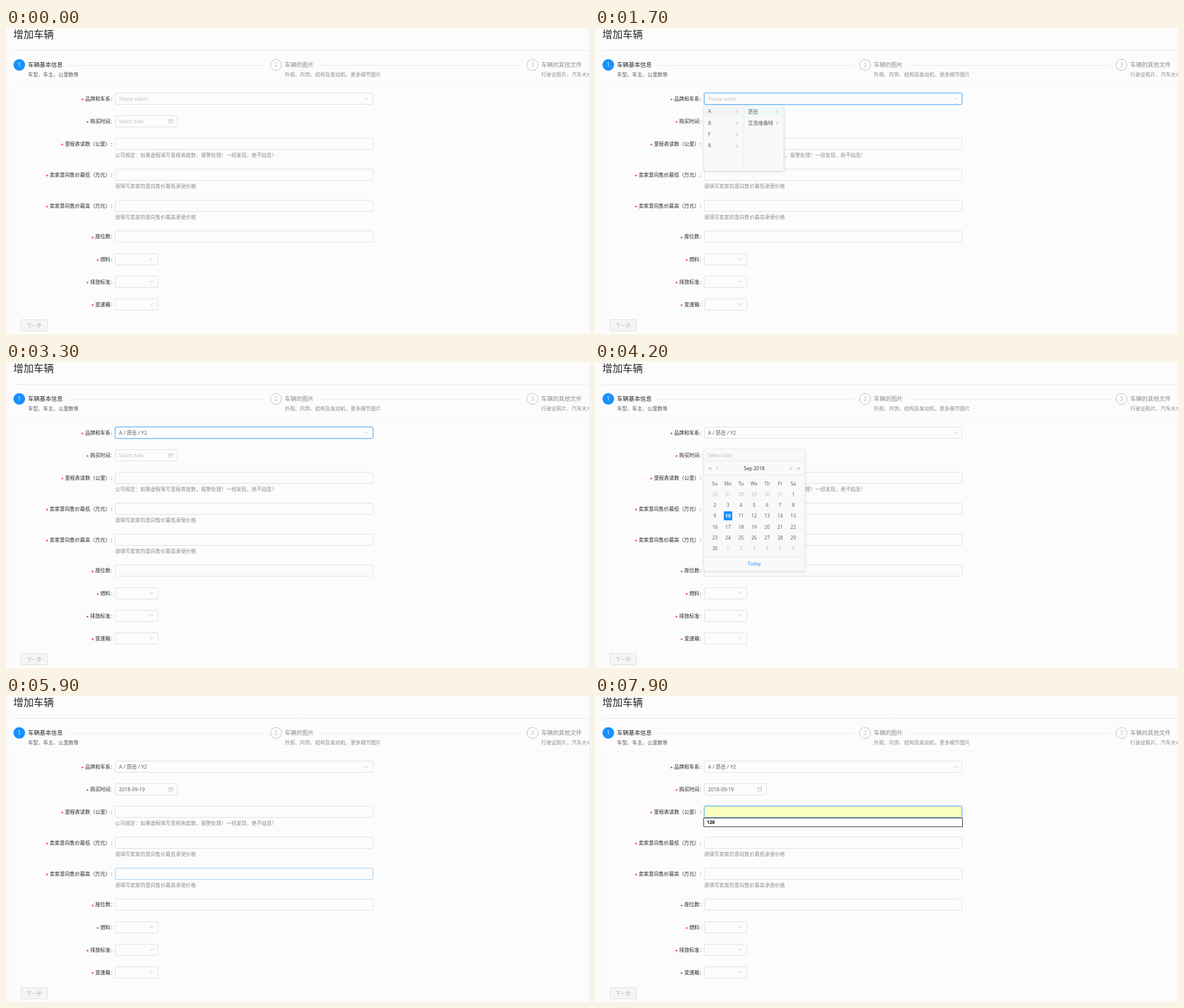
Write an HTML page with a canvas that moves like this. It is 1032 by 543 pixels and loops after 8 s.

```html
<!DOCTYPE html>
<html lang="zh">
<head>
<meta charset="utf-8">
<style>
html, body { margin: 0; width: 100%; height: 100%; overflow: hidden; background: #fcfcfc; }
canvas { display: block; }
</style>
</head>
<body>
<canvas id="stage" width="1032" height="543"></canvas>
<script>
const ctx = document.getElementById('stage').getContext('2d');
const LOOP = 8000, STEP = 100;
const FONT = '"Open Sans", "Noto Sans CJK SC", "Noto Sans CJK", sans-serif';
const PAPER = '#fcfcfc', PANEL = '#f9f9f9', EDGE = '#dedede', BLUE = '#1890ff';
const CJK = 8.96, LATIN = 8.5;
const ink = a => `rgba(0,0,0,${a})`;
const MAKE = '昂岳', MODEL = 'Y2';
const ROW = { brand: 125.5, date: 165.5, km: 205.5, min: 260.5, max: 315.5, seats: 370, fuel: 410.5, emission: 450.5, gear: 490.5 };
const LABELS = {
  brand: '品牌和车系', date: '购买时间', km: '里程表读数（公里）', min: '卖家意向售价最低（万元）',
  max: '卖家意向售价最高（万元）', seats: '座位数', fuel: '燃料', emission: '排放标准', gear: '变速箱'
};
let now = 0;

// Progress through a stepped transition; the last step is complete.
const ramp = (first, last) => Math.min(1, Math.max(0, (now - first + STEP) / (last - first + STEP)));
const during = (from, to) => now >= from && now < to;

function text(str, x, y, { size = CJK, color = ink(.65), weight = 400, align = 'left' } = {}) {
  ctx.font = `${weight} ${size}px ${FONT}`;
  ctx.fillStyle = color;
  ctx.textAlign = align;
  ctx.fillText(str, x, y + size * .36);
}

function line(points, color = '#e8e8e8', width = 1) {
  ctx.beginPath();
  points.forEach(([x, y]) => ctx.lineTo(x, y));
  ctx.strokeStyle = color;
  ctx.lineWidth = width;
  ctx.stroke();
}

function box(x, y, w, h, r, fill, stroke, width = 1) {
  ctx.beginPath();
  ctx.roundRect(x, y, w, h, r);
  if (fill) { ctx.fillStyle = fill; ctx.fill(); }
  if (stroke) { ctx.strokeStyle = stroke; ctx.lineWidth = width; ctx.stroke(); }
}

function chevron(x, y, dir, size = 2.7, color = ink(.28)) {
  const s = size, d = size * .55;
  const shapes = {
    down: [[-s, -d], [0, d], [s, -d]],
    up: [[-s, d], [0, -d], [s, d]],
    right: [[-d, -s], [d, 0], [-d, s]],
    left: [[d, -s], [-d, 0], [d, s]]
  };
  line(shapes[dir].map(([a, b]) => [x + a, y + b]), color, .8);
}

function field(y, w, { hover = 0, focus = 0, fill = PAPER } = {}) {
  const active = Math.max(hover, focus);
  if (focus) box(192.5, y - 11, w + 2, 22, 3, null, `rgba(24,144,255,${.3 * focus})`);
  box(193.5, y - 10, w, 20, 2.5, fill, EDGE);
  if (active) box(193.5, y - 10, w, 20, 2.5, null, `rgba(64,169,255,${active * .75})`);
}

function panel(x, y, w, h) {
  ctx.save();
  ctx.shadowColor = ink(.17);
  ctx.shadowBlur = 5;
  ctx.shadowOffsetY = 1.3;
  box(x, y, w, h, 2, PANEL);
  ctx.restore();
}

// Popups unfold from their top edge while fading.
function popup(top, p, draw) {
  if (p <= 0) return;
  ctx.save();
  ctx.globalAlpha = p;
  ctx.translate(0, top);
  ctx.scale(1, .8 + .2 * p);
  ctx.translate(0, -top);
  draw();
  ctx.restore();
}

function stepHead(n, x, title, note, end) {
  const active = n === 1;
  ctx.beginPath();
  ctx.arc(x + 10.5, 65.5, active ? 10.3 : 9.8, 0, Math.PI * 2);
  if (active) {
    ctx.fillStyle = BLUE;
    ctx.fill();
  } else {
    ctx.strokeStyle = ink(.25);
    ctx.lineWidth = 1;
    ctx.stroke();
  }
  text(n, x + 10.5, 65.5, { size: 10, align: 'center', color: active ? '#fff' : ink(.25) });
  text(title, x + 26, 65.5, { size: 10.24, color: ink(active ? .85 : .45) });
  text(note, x + 26, 83, { color: ink(active ? .65 : .45) });
  if (end) line([[x + 36 + title.length * 10.24, 66.5], [end, 66.5]]);
}

function page() {
  ctx.fillStyle = PAPER;
  ctx.fillRect(0, 0, 1032, 543);
  text('增加车辆', 13, 12, { size: 17.92, color: ink(.85) });
  line([[13, 39.5], [1032, 39.5]]);
  stepHead(1, 13, '车辆基本信息', '车型、车主、公里数等', 457);
  stepHead(2, 467.5, '车辆的图片', '外观、内饰、结构及发动机、更多细节图片', 911);
  stepHead(3, 921.5, '车辆的其他文件', '行驶证照片、汽车大本等');
  ctx.setLineDash([2, 2]);
  box(13.5, 99.5, 1100, 500, 4, null, '#ececec');
  ctx.setLineDash([]);

  for (const key in LABELS) {
    const label = LABELS[key], left = 184.8 - label.length * CJK;
    text('*', left - 4.7, ROW[key] + 2, { size: 7.5, weight: 700, color: '#f5222d', align: 'center' });
    text(label, left, ROW[key], { color: ink(.85) });
    text(':', 185.8, ROW[key], { color: ink(.85) });
  }
  const hint = { color: ink(.45) };
  text('公司规定：如果虚假填写里程表度数，报警处理！一经发现，绝不姑息！', 193, 226, hint);
  text('请填写卖家的意向售价最低承受价格', 193, 281, hint);
  text('请填写卖家的意向售价最高承受价格', 193, 336, hint);

  field(ROW.seats, 456);
  for (const key of ['fuel', 'emission', 'gear']) {
    field(ROW[key], 75.5);
    chevron(257.5, ROW[key] - .5, 'down');
  }
  box(26.5, 517.5, 47, 20, 2.5, '#f5f5f5', EDGE);
  text('下一步', 50, 528, { color: ink(.25), align: 'center' });
}

function brandField() {
  const blur = 1 - ramp(3700, 3900);
  const open = during(1100, 2900);
  field(ROW.brand, 456, { hover: ramp(800, 900) * blur, focus: ramp(1100, 1300) * blur });
  if (now < 2900) text('Please select', 200, ROW.brand, { size: LATIN - .1, color: ink(.25) });
  else text(`A / ${MAKE} / ${MODEL}`, 200, ROW.brand);
  chevron(637.5, ROW.brand, open ? 'up' : 'down');
}

function dateField() {
  const hover = ramp(3700, 3800) * (1 - ramp(5400, 5700));
  field(ROW.date, 110, { hover });
  if (now < 5300) text('Select date', 200, ROW.date, { size: LATIN, color: ink(.25) });
  else text('2018-09-19', 200, ROW.date, { size: 8.8 });
  box(288, 162.8, 7, 6.2, .5, null, ink(.25), .8);
  line([[288, 165.3], [295, 165.3]], ink(.25), .8);
  for (const x of [289.8, 293.2]) line([[x, 161.6], [x, 163.6]], ink(.25), .8);
}

function priceFields() {
  field(ROW.min, 456, { hover: ramp(6000, 6100) * (1 - ramp(6200, 6300)) });
  field(ROW.max, 456, { hover: ramp(5900, 6000) * (1 - ramp(6100, 6200)) });
}

function mileageField() {
  const filled = ramp(7400, 7600);
  field(ROW.km, 456, {
    hover: ramp(6500, 6700),
    focus: ramp(6900, 7000),
    fill: filled ? `rgb(252,${252 + Math.round(3 * filled)},${252 - Math.round(63 * filled)})` : PAPER
  });
  if (during(7000, 7400)) line([[200.5, 200], [200.5, 211]], ink(.7));
  const preview = during(7400, 7900);
  if (preview) text('120', 200, ROW.km, { size: LATIN });
  if (now >= 6900) {
    box(192.5, 216.5, 458, 15.5, 0, preview ? '#e4e4e4' : '#fff', '#222');
    text('120', 198, 224.5, { size: 8.2, weight: 700, color: '#000' });
  }
}

function column(x, items, { picked = -1, hovered = -1, hover = 1, arrows = true, dark = -1 }) {
  items.forEach((item, i) => {
    const top = 138 + i * 20.3, mid = top + 10.4;
    if (i === picked || i === hovered) {
      ctx.fillStyle = i === picked ? '#f4f4f4' : `rgba(236,250,248,${hover * .75})`;
      ctx.fillRect(x, top, 70, 20.3);
    }
    text(item, x + 7.3, mid, { size: /\w/.test(item) ? LATIN : CJK, color: ink(i === dark ? .85 : .65) });
    if (arrows) chevron(x + 58.5, mid, 'right', 2.2, ink(.4));
  });
  line([[x + 70.5, 138], [x + 70.5, 252]]);
}

function cascader() {
  if (!during(1100, 3300)) return;
  const second = ramp(1500, 1700), third = now >= 2100;
  const width = third ? 212 : second ? 141 : 71;
  popup(137, ramp(1100, 1300) * (1 - ramp(2900, 3200)), () => {
    panel(193, 137, width, 116);
    column(193, ['A', 'B', 'F', 'R'], { picked: second ? 0 : -1, hovered: now >= 1300 ? 0 : -1 });
    if (second) column(263.5, [MAKE, '艾洛维桑特'], { picked: third ? 0 : -1, hovered: 0, hover: second });
    if (third) {
      column(334, ['Y1', MODEL], {
        hovered: 1, hover: ramp(2600, 2700), arrows: false, dark: now >= 2400 ? 1 : -1
      });
    }
  });
}

function calendar() {
  const shown = ramp(3900, 4200) * (1 - ramp(5400, 5700));
  popup(155, shown, () => {
    const picked = now >= 5300;
    panel(193, 155, 178.5, 216);
    if (picked) text('2018-09-19', 199.5, 165.5, { size: 8.8 });
    else text('Select date', 199.5, 165.5, { size: LATIN, color: ink(.27) });
    for (const y of [175.5, 200.5, 345.5]) line([[193, y], [371.5, y]]);
    text('Sep 2018', 282, 188.5, { size: LATIN, weight: 500, color: ink(.85), align: 'center' });
    for (const x of [202.7, 205.3, 216.5]) chevron(x, 189, 'left', 2, ink(.45));
    for (const x of [347, 358.7, 361.3]) chevron(x, 189, 'right', 2, ink(.45));
    const colX = i => 212.3 + i * 23.1;
    ['Su', 'Mo', 'Tu', 'We', 'Th', 'Fr', 'Sa'].forEach((day, i) =>
      text(day, colX(i), 216, { size: LATIN, align: 'center' }));
    for (let i = 0; i < 42; i++) {
      const offset = i - 5;
      const inside = offset >= 1 && offset <= 30;
      const day = offset < 1 ? offset + 31 : inside ? offset : offset - 30;
      const x = colX(i % 7), y = 235.3 + Math.floor(i / 7) * 19.05;
      const chosen = inside && day === (picked ? 19 : 10);
      const hovered = inside && day === 19 && now >= 5000;
      if (chosen) box(Math.round(x - 7.5), Math.round(y - 8), 15, 16, 1, BLUE);
      text(day, x, y, {
        size: LATIN, align: 'center', weight: chosen ? 700 : 400,
        color: chosen ? '#fff' : ink(hovered ? .85 : inside ? .65 : .25)
      });
    }
    text('Today', 282, 358, { size: LATIN, color: BLUE, align: 'center' });
  });
}

function render(ms) {
  now = Math.floor((ms % LOOP) / STEP) * STEP;
  page();
  brandField();
  dateField();
  priceFields();
  mileageField();
  cascader();
  calendar();
}

const start = performance.now();
function tick() {
  render(performance.now() - start);
  requestAnimationFrame(tick);
}
tick();
</script>
</body>
</html>
```
